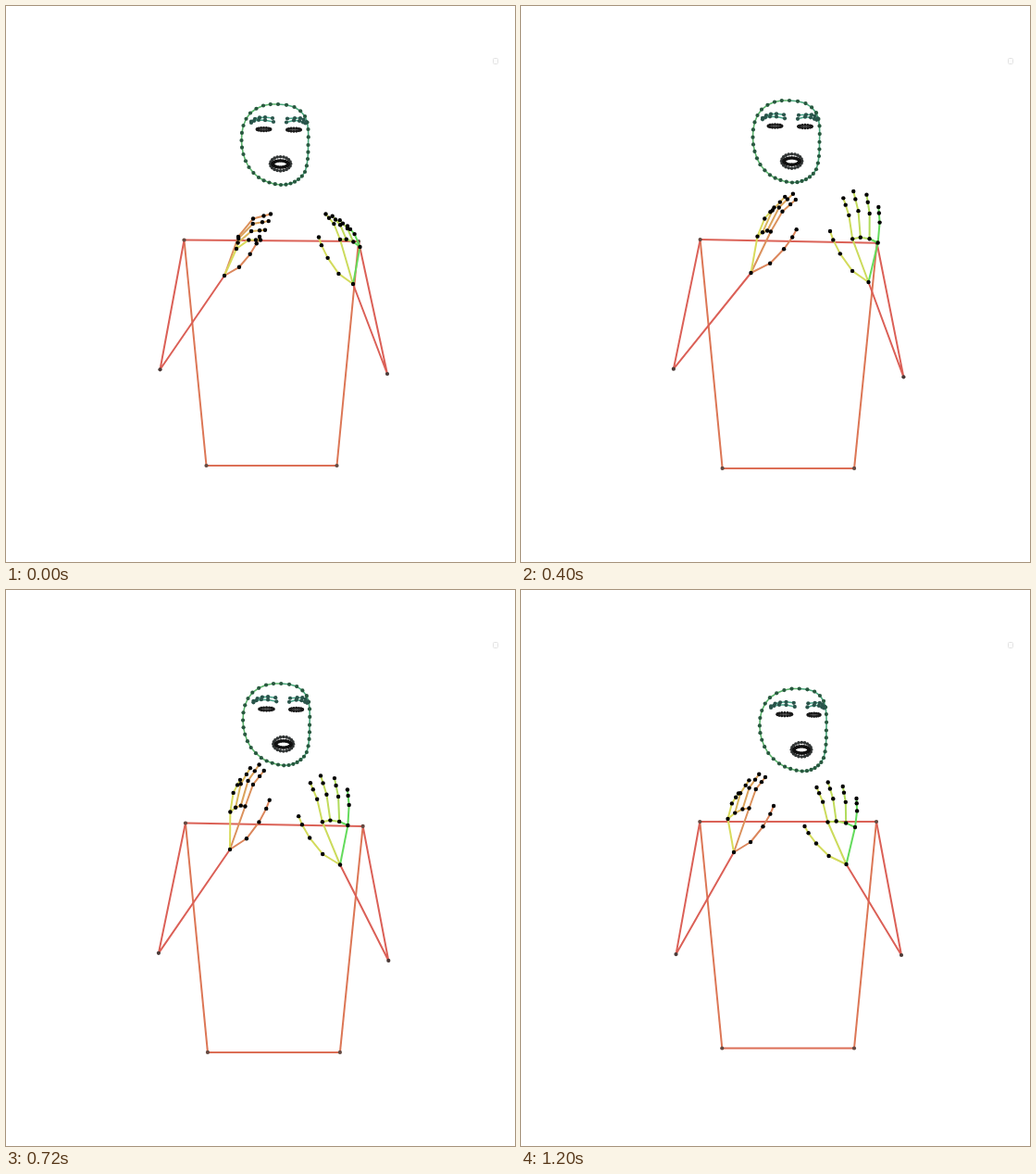
Animation of 550 by 600 pixels, one loop 1.28 s. Source, as an HTML page with a canvas:

```html
<!DOCTYPE html>
<html lang="en">
<head>
<meta charset="utf-8">
<title>Signing skeleton</title>
<style>
  html, body { margin: 0; width: 100%; height: 100%; overflow: hidden; background: #fff; }
  canvas { display: block; }
</style>
</head>
<body>
<canvas id="stage" width="550" height="600"></canvas>
<script>
const ctx = document.getElementById('stage').getContext('2d');
const STEP = 80, STEPS = 16;

const mix = (a, b, t) => a + (b - a) * t;
const mixPoint = (a, b, t) => [mix(a[0], b[0], t), mix(a[1], b[1], t)];
const scale = ([x, y], sx, sy = sx) => [x * sx, y * sy];
const pairs = list => Array.from({ length: list.length / 2 }, (_, i) => [list[2 * i], list[2 * i + 1]]);

// Piecewise linear value of a keyed quantity
function sample(times, values, step) {
  const i = Math.max(1, times.findIndex(t => t >= step));
  return mix(values[i - 1], values[i], (step - times[i - 1]) / (times[i] - times[i - 1]));
}

const pathTimes = [0, 2, 5, 7, 9, 11, 15];
const path = (...values) => step => sample(pathTimes, values, step);

const faceX = path(0, -.5, -4, -1.5, 1.5, 2, 3.3);
const faceTop = path(0, -.5, -4, -2.5, -5, -5, .5);
const faceBottom = path(0, -.5, -2.5, -2.8, -3.7, -2.3, 2.5);

// Poses relative to the wrist: index and pinky knuckle, index and pinky tip, thumb tip
const poseTimes = [0, 2, 11, 15];
const leftHand = {
  side: 1, curl: .08, hues: [20, 25, 33, 43, 61],
  x: path(236, 250, 248.5, 240.5, 242, 236, 230),
  y: path(291, 297, 288, 284, 280, 275.5, 283),
  poses: [
    [15, -42, 13, -29, 50, -66.5, 39, -38.5, 38, -42],
    [25, -43, 12, -38.5, 57, -74.5, 35.5, -67, 54, -42],
    [14, -47.5, -3, -41, 31, -88, 4, -77.5, 39.5, -56.5],
    [16.5, -47.5, -6.5, -36, 34, -81, 5, -63.5, 43, -50]
  ]
};
const rightHand = {
  side: -1, curl: .04, hues: [64, 67, 72, 80, 116],
  x: path(375, 376, 375.5, 369, 361, 352.5, 351.5),
  y: path(300, 301, 298, 295.5, 296.5, 293, 296),
  poses: [
    [-14, -48, 7.5, -40, -29.5, -75.5, -6, -62.5, -37, -50.5],
    [-16, -47, 11.5, -42.5, -23.5, -92.5, 13, -81, -39, -57],
    [-20, -46, 7.5, -42.5, -34.5, -87, 6.5, -81, -46.5, -51],
    [-20, -45.5, 9.5, -40, -32, -83, 11, -71, -45, -41]
  ]
};

function line(points, color, width = 2, closed = false) {
  ctx.beginPath();
  points.forEach(p => ctx.lineTo(...p));
  if (closed) ctx.closePath();
  ctx.strokeStyle = color;
  ctx.lineWidth = width;
  ctx.stroke();
}

function dots(points, color, r = 2.2) {
  ctx.fillStyle = color;
  for (const [x, y] of points) {
    ctx.beginPath();
    ctx.arc(x, y, r, 0, 7);
    ctx.fill();
  }
}

const ring = (cx, cy, rx, ry, n) => Array.from({ length: n }, (_, i) => {
  const a = 2 * Math.PI * i / n;
  return [cx + rx * Math.cos(a), cy + ry * Math.sin(a)];
});

// Adds a smooth point halfway between neighbours of a closed outline
function refine(points) {
  const at = i => points[(i + points.length) % points.length];
  return points.flatMap((p, i) => [p, [0, 1].map(j =>
    (9 * (p[j] + at(i + 1)[j]) - at(i - 1)[j] - at(i + 2)[j]) / 16)]);
}

const oval = refine(pairs([294, 106, 311.5, 109, 323, 119, 326.5, 133, 326.5, 150, 326, 165,
  323, 179, 316, 187, 307.5, 191.5, 297, 193, 284.5, 190.5, 273, 185, 262.5, 174,
  256.5, 160, 254.5, 145, 256.5, 129, 264, 115.5, 278, 107.5]));
const brows = [
  [265, 124.5, 269, 121.8, 274, 120.4, 280, 120, 288, 121],
  [265, 126, 268, 124, 273, 123, 280, 123.2, 289, 125],
  [304, 121.5, 312, 121, 318, 121, 321.5, 122.5, 324.5, 125],
  [303, 125.5, 311, 123.4, 317, 124, 321, 125.5, 323.5, 126.5]
].map(pairs);

function drawFace(step) {
  const dx = faceX(step), top = faceTop(step), bottom = faceBottom(step);
  const yaw = 3.5 * Math.min(1, Math.max(0, (step - 7) / 4));
  const place = points => points.map(([x, y]) => {
    const u = (x - 290.5) / 36.5;
    return [x + dx + yaw * Math.max(0, 1 - u * u), y + mix(top, bottom, (y - 106) / 87)];
  });

  const rim = place(oval);
  rim.forEach((p, i) => line([p, rim[(i + 1) % rim.length]], i < 18 ? '#4aa87c' : '#5cb56c', 1.6));
  dots(rim, '#28583f', 2.1);
  for (const brow of brows.map(place)) {
    line(brow, '#48a58a', 1.5);
    dots(brow, '#2a554b', 2.1);
  }
  for (const [cx, cy] of [[278.5, 133.1], [311, 133.6]]) {
    const lid = place(ring(cx, cy, 7.6, 1.8, 16));
    ctx.fillStyle = '#555';
    line(lid, '#333', 1, true);
    ctx.fill();
    dots(lid, '#1a1a1a', 1.4);
  }
  const outer = place(ring(296.6, 170.3, 11, 7.6, 20));
  const inner = place(ring(296.6, 170.5, 8.4, 3.6, 20));
  line(outer, '#444', 1, true);
  line(inner, '#222', 1.6, true);
  dots(outer, '#303434', 1.8);
  dots(inner, '#111', 1.9);
}

// Each joint: start, swell in the middle of the loop, drift to its end
const joints = [
  [192.5, 252.5, 1, .5, .8, -2.5],
  [381, 254, 3, 3.5, 3, -4],
  [166.5, 392.3, -2.3, -1, 1, .8],
  [412, 397, 2, 5, -1, -3],
  [216.5, 496, 1, 4, .8, -1.5],
  [357.5, 496, 2, 4, 2.5, -1.5]
];

function drawBody(step) {
  const t = step / (STEPS - 1), swell = Math.sin(Math.PI * t);
  const [ls, rs, le, re, lh, rh] = joints.map(([x, y, sx, sy, dx, dy]) =>
    [x + sx * swell + dx * t, y + sy * swell + dy * t]);
  line([ls, lh], '#dc7655');
  line([rs, rh], '#dc7655');
  line([lh, rh], '#dc6f56');
  line([ls, rs], '#db6257');
  line([ls, le, [leftHand.x(step), leftHand.y(step)]], '#db6057');
  line([rs, re, [rightHand.x(step), rightHand.y(step)]], '#db6057');
  dots([ls, rs, lh, rh], '#654a42', 2.1);
  dots([le, re], '#4a3a38', 2.1);
}

function drawHand({ side, curl, hues, x, y, poses }, step) {
  const fold = Math.max(0, 1 - step / 2);
  const [indexBase, pinkyBase, indexTip, pinkyTip, thumbTip] =
    pairs(poses[0].map((_, i) => sample(poseTimes, poses.map(p => p[i]), step)));

  // Middle and ring finger lie between their neighbours, a little further out
  const spread = (a, b, i, reach) => scale(mixPoint(a, b, (i - 1) / 3), i === 2 || i === 3 ? reach : 1);
  const fingers = hues.map((_, i) => {
    const a = i ? spread(indexBase, pinkyBase, i, 1.065) : scale(thumbTip, .42, .22);
    const b = i ? spread(indexTip, pinkyTip, i, 1.12 - .09 * fold) : thumbTip;
    const bend = side * (i ? curl * (1 + fold) : -.05);
    const joint = (t, k) => {
      const [px, py] = mixPoint(a, b, t);
      return [px + (b[1] - a[1]) * bend * k, py - (b[0] - a[0]) * bend * k];
    };
    const bones = i ? [a, joint(.57, 1), joint(.83, .4), b] : [a, joint(.46, 1), joint(.8, .7), b];
    return bones.map(([px, py]) => [px + x(step), py + y(step)]);
  });

  const wrist = [x(step), y(step)];
  const color = i => `hsl(${hues[i]} 64% 61%)`;
  fingers.forEach((finger, i) => {
    line(i < 2 ? [wrist, ...finger] : finger, color(i));
    if (i > 1) line([fingers[i - 1][0], finger[0]], color(i));
  });
  line([wrist, fingers[4][0]], color(4));
  dots([wrist, ...fingers.flat()], '#000');
}

function draw(now) {
  const step = Math.floor(now / STEP) % STEPS;
  ctx.clearRect(0, 0, 550, 600);
  ctx.lineJoin = 'round';
  ctx.strokeStyle = '#e2e2e2';
  ctx.lineWidth = 1;
  ctx.beginPath();
  ctx.roundRect(526.5, 56.5, 5, 6, 1);
  ctx.stroke();

  drawBody(step);
  drawFace(step);
  drawHand(leftHand, step);
  drawHand(rightHand, step);
  requestAnimationFrame(draw);
}

draw(0);
</script>
</body>
</html>
```
